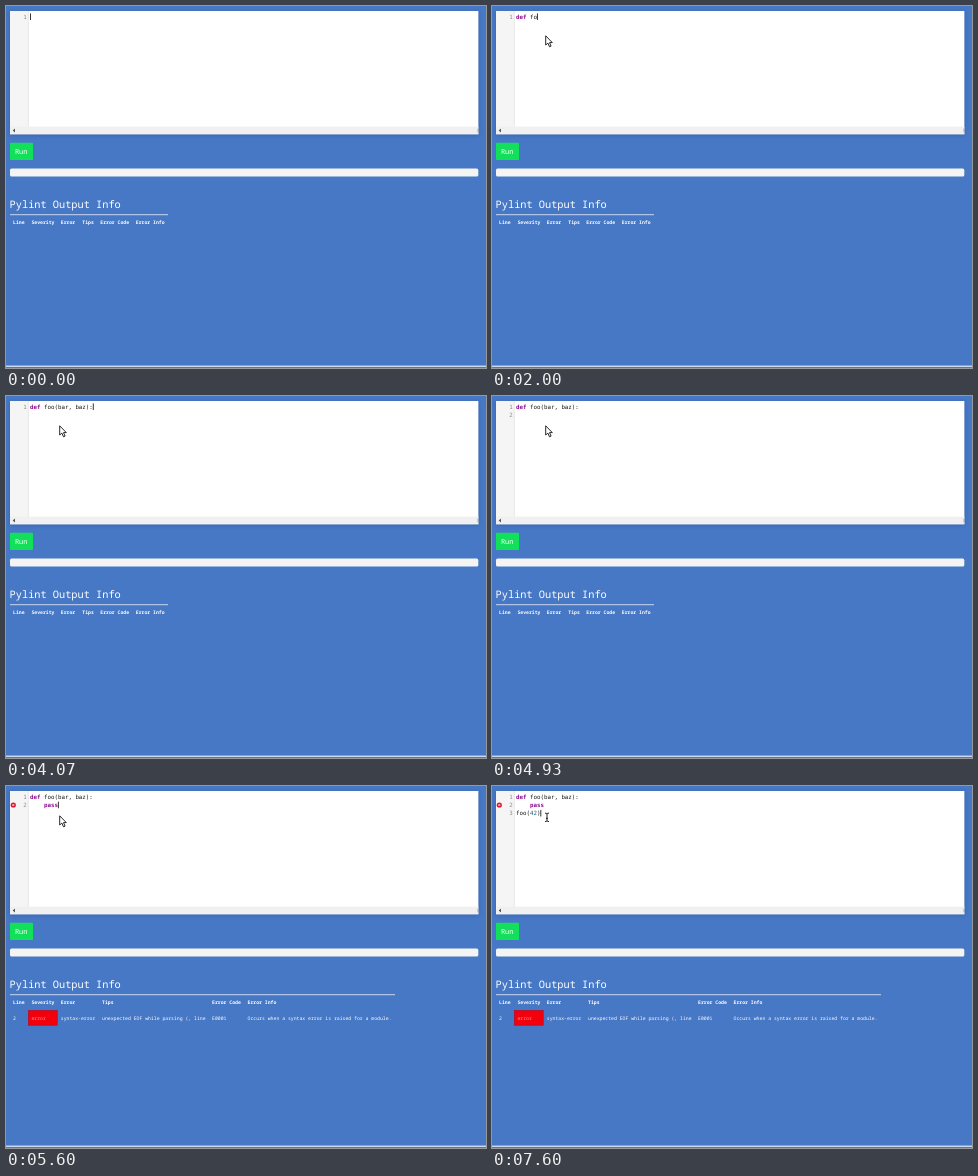
Animation, 480 px wide and 362 px high, one loop 8 s. Source, as an HTML page:

```html
<!DOCTYPE html>
<html lang="en">
<head>
<meta charset="utf-8">
<title>Lint editor</title>
<style>
html, body { margin: 0; width: 100%; height: 100%; overflow: hidden; background: #4778c5; }
svg { display: block; width: 480px; height: 362px; }
text { white-space: pre; text-rendering: geometricPrecision; }
.code { font: 5.8px "DejaVu Sans Mono", monospace; fill: #161616; }
.ui { font: 4.8px "Noto Sans Mono", monospace; fill: #fff; }
.head { font-weight: 700; }
.kw { font-weight: 700; fill: #8f0a92; }
.num { fill: #26607a; }
.no { fill: #8c8c8c; text-anchor: end; }
</style>
</head>
<body>
<svg viewBox="0 0 480 362">
  <defs>
    <filter id="shadow" x="-5%" y="-10%" width="110%" height="125%">
      <feDropShadow dx="0" dy="1" stdDeviation="2" flood-color="#173a75" flood-opacity=".35"/>
    </filter>
  </defs>
  <rect width="480" height="362" fill="#4778c5"/>
  <rect x="4" y="5" width="468.3" height="123.2" fill="#fff" filter="url(#shadow)"/>
  <rect x="4" y="5" width="18.5" height="116" fill="#f6f5f6"/>
  <path d="M22.3 5V121" stroke="#dcdcdc" stroke-width=".6"/>
  <rect x="4" y="120.6" width="468.3" height="7.6" fill="#f0f0f0"/>
  <path d="M9 122.6V126.4L6.7 124.5Z" fill="#555"/>
  <path d="M472 122.6V126.4" stroke="#777" stroke-width=".6"/>
  <g id="editor"></g>
  <rect id="caret" width=".8" height="6.6" fill="#000"/>

  <rect x="4" y="136.8" width="23" height="17.2" rx="1" fill="#13e05a"/>
  <text class="ui" x="8.9" y="147.8" style="font-size:7px">Run</text>
  <rect x="4" y="162.6" width="468.3" height="8" rx="1.6" fill="#f4f4f4"/>
  <text class="ui" x="3.6" y="202" style="font-size:10.3px;font-weight:300">Pylint Output Info</text>
  <path id="rule" stroke="#d5e0f2" stroke-width=".9"/>
  <g id="table"></g>
  <g id="result">
    <circle cx="7.3" cy="19" r="2.6" fill="#d8152c"/>
    <path d="M6.3 18L8.3 20M8.3 18L6.3 20" stroke="#fff" stroke-width=".7"/>
    <rect x="22.4" y="224.4" width="28.8" height="14.8" fill="#f4000c" stroke="#b80f2c" stroke-width=".8"/>
    <g id="row"></g>
  </g>
  <rect y="359.6" width="480" height="1.3" fill="#dbe4f3"/>
  <path id="arrow" d="M0 0V9.2L2.2 7.3L3.8 11L5.4 10.3L3.8 6.8H6.6Z" fill="#fff" stroke="#111" stroke-width=".9" stroke-linejoin="round"/>
  <path id="beam" d="M-2 -4.2Q0 -4.2 0 -3.2Q0 -4.2 2 -4.2M0 -3.4V3.6M-2 4.3Q0 4.3 0 3.4Q0 4.3 2 4.3M-1 1H1" fill="none" stroke="#222" stroke-width="1"/>
</svg>
<script>
const LOOP = 8000, CHAR = 3.49, LEFT = 24, LINE = 8.25;
const RESULT_AT = 5600, BEAM_AT = 7200;
const $ = id => document.getElementById(id);

// Each typed chunk appears at its time.
const typing = [
  [1000, 'd'], [1130, 'e'], [1200, 'f'], [1670, ' '],
  [1870, 'f'], [2000, 'o'], [2130, 'o'], [2470, '('],
  [2730, 'b'], [2800, 'a'], [2870, 'r'], [3000, ','], [3070, ' '],
  [3400, 'b'], [3530, 'a'], [3600, 'z'], [3800, ')'], [4070, ':'],
  [4400, '\n    '], [5130, 'p'], [5270, 'a'], [5330, 's'], [5470, 's'],
  [5670, '\n'], [6200, 'f'], [6330, 'o'], [6530, 'o'], [6730, '('],
  [7200, '4'], [7270, '2'], [7600, ')']
];

// Mouse position: [time, x, y], held until the next entry.
const mouse = [
  [70, 46, 203], [400, 60, 150], [470, 105, 84], [530, 74, 22], [600, 53.7, 29.8]
];

const label = (text, x, y, cls = 'ui', extra = '') =>
  `<text class="${cls}" x="${x}" y="${y}" ${extra}>${text}</text>`;

const columns = ['Line', 'Severity', 'Error', 'Tips', 'Error Code', 'Error Info'];
const narrow = [7, 25.4, 54.8, 76.3, 94.3, 129.8];
const wide = [7, 25.4, 54.8, 96, 206, 241.6];
const cells = ['2', 'error', 'syntax-error', 'unexpected EOF while parsing (, line', 'E0001',
  'Occurs when a syntax error is raised for a module.'];

$('row').innerHTML = cells.map((c, i) =>
  label(c, wide[i], 233.6, 'ui', i === 1 ? 'style="fill:#ff8d92"' : '')).join('');

const highlight = line => line
  .replace(/\d+/g, '<tspan class="num">$&</tspan>')
  .replace(/\b(def|pass)\b/g, '<tspan class="kw">$&</tspan>');

let shownCode, shownTable;

function drawCode(code) {
  if (code === shownCode) return;
  shownCode = code;
  const lines = code.split('\n');
  $('editor').innerHTML = lines.map((line, i) => {
    const y = 12.6 + i * LINE;
    const indent = line.length - line.trimStart().length;
    return label(i + 1, 20.8, y, 'code no') +
      label(highlight(line.trimStart()), LEFT + indent * CHAR, y, 'code');
  }).join('');
  const last = lines.length - 1;
  $('caret').setAttribute('x', LEFT + lines[last].length * CHAR);
  $('caret').setAttribute('y', 7.4 + last * LINE);
}

function drawTable(done) {
  if (done === shownTable) return;
  shownTable = done;
  const xs = done ? wide : narrow;
  $('table').innerHTML = columns.map((c, i) => label(c, xs[i], 218, 'ui head')).join('');
  $('rule').setAttribute('d', `M4 208.7H${done ? 389 : 162}`);
}

const show = (id, on) => $(id).setAttribute('visibility', on ? 'visible' : 'hidden');

function render(t) {
  drawCode(typing.filter(k => k[0] <= t).map(k => k[1]).join(''));
  show('caret', t < 4930 || t >= 5130);
  drawTable(t >= RESULT_AT);
  show('result', t >= RESULT_AT);

  const spot = mouse.filter(m => m[0] <= t).pop();
  show('arrow', spot && t < BEAM_AT);
  show('beam', t >= BEAM_AT);
  if (spot) $('arrow').setAttribute('transform', `translate(${spot[1]} ${spot[2]})`);
}

$('beam').setAttribute('transform', 'translate(55 31.3)');
const start = performance.now();
function tick() {
  render((performance.now() - start) % LOOP);
  requestAnimationFrame(tick);
}
tick();
</script>
</body>
</html>
```
